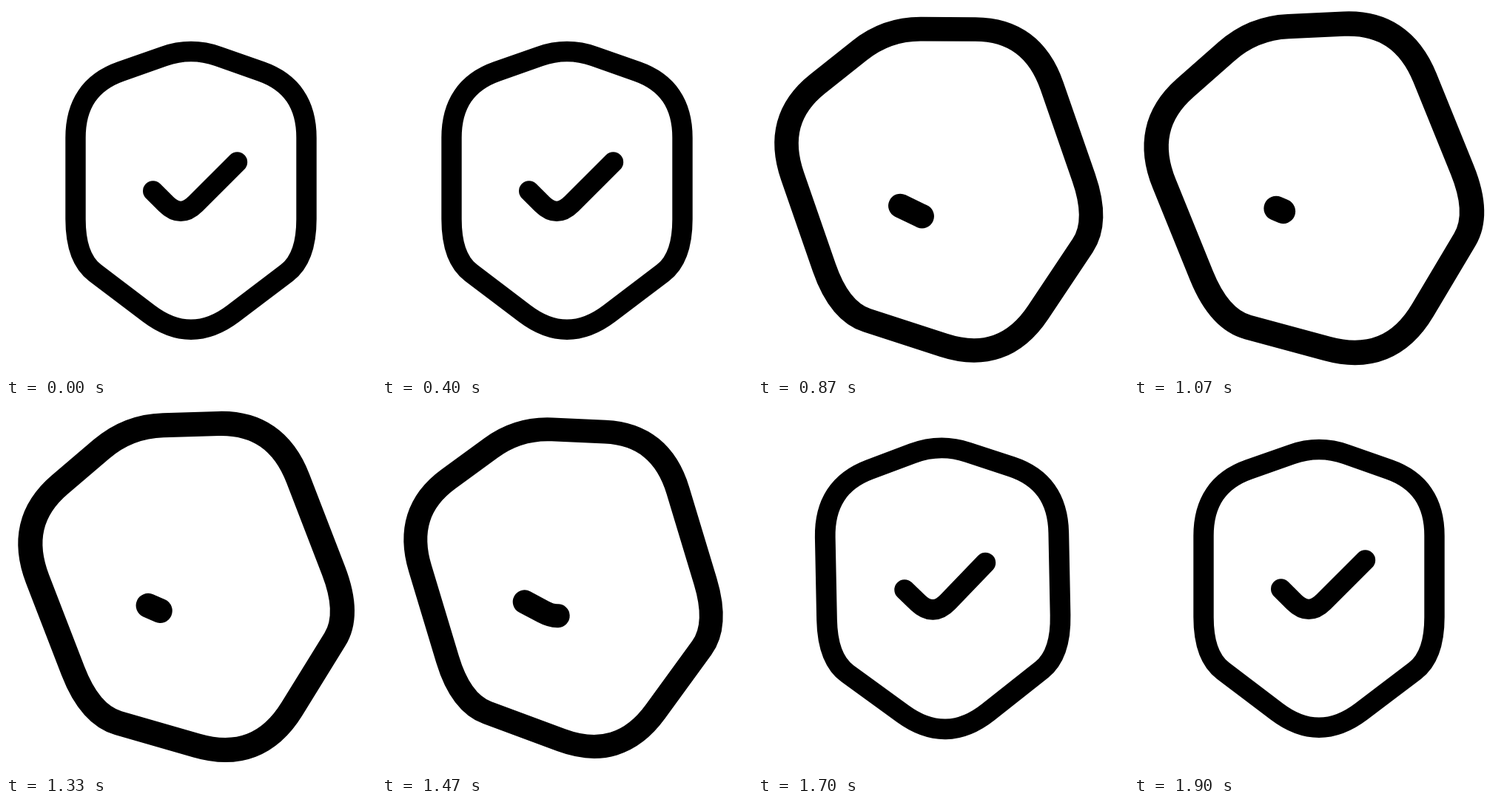
An HTML page with a canvas that plays this animation: 500x500 px, repeating every 2 s.

```html
<!DOCTYPE html>
<html lang="en">
<head>
<meta charset="utf-8">
<title>Shield check</title>
<style>
  html, body { margin: 0; width: 100%; height: 100%; overflow: hidden; background: #fff; }
  canvas { display: block; width: 100vw; height: 100vh; object-fit: contain; }
</style>
</head>
<body>
<canvas id="stage" width="500" height="500"></canvas>
<script>
const ctx = document.getElementById('stage').getContext('2d');
const LOOP = 2000, FRAME = 1000 / 30;
const START = 390, PEAK = 1143, END = 1895;
const MAX_TURN = -22.2 * Math.PI / 180, MAX_GROWTH = 0.22, MAX_TRIM = 0.95;
const STROKE = 27.4, CHECK_LENGTH = 150.4;

const shield = new Path2D();
shield.moveTo(-37, -181.9);
shield.quadraticCurveTo(0, -195, 37, -181.9);
shield.lineTo(95, -161.5);
shield.quadraticCurveTo(156, -140, 156, -72);
shield.lineTo(156, 38);
shield.quadraticCurveTo(156, 90.5, 129.7, 110.5);
shield.lineTo(57, 165.6);
shield.quadraticCurveTo(0, 208.9, -57, 165.6);
shield.lineTo(-129.7, 110.5);
shield.quadraticCurveTo(-156, 90.5, -156, 38);
shield.lineTo(-156, -72);
shield.quadraticCurveTo(-156, -140, -95, -161.5);
shield.closePath();

const check = new Path2D();
check.moveTo(-51.3, 0);
check.lineTo(-34, 17.3);
check.quadraticCurveTo(-13.9, 37.4, 6.2, 17.3);
check.lineTo(62.5, -39);

// cubic-bezier(.8, 0, .2, 1), solved by bisection
function ease(x) {
  if (x <= 0) return 0;
  if (x >= 1) return 1;
  let low = 0, high = 1, s = 0.5;
  for (let i = 0; i < 30; i++) {
    s = (low + high) / 2;
    const r = 1 - s;
    if (2.4 * s * r * r + 0.6 * s * s * r + s ** 3 < x) low = s;
    else high = s;
  }
  return s * s * (3 - 2 * s);
}

function amountAt(ms) {
  return ms < PEAK
    ? ease((ms - START) / (PEAK - START))
    : ease((END - ms) / (END - PEAK));
}

function draw(ms) {
  const amount = amountAt(ms);
  const scale = 1 + MAX_GROWTH * amount;
  ctx.setTransform(1, 0, 0, 1, 0, 0);
  ctx.fillStyle = '#fff';
  ctx.fillRect(0, 0, 500, 500);
  ctx.translate(250, 250);
  ctx.rotate(MAX_TURN * amount);
  ctx.scale(scale, scale);
  ctx.strokeStyle = '#000';
  ctx.lineWidth = STROKE;
  ctx.lineCap = ctx.lineJoin = 'round';
  ctx.setLineDash([]);
  ctx.stroke(shield);
  if (amount > 0) ctx.setLineDash([CHECK_LENGTH * (1 - MAX_TRIM * amount), 1000]);
  ctx.stroke(check);
}

const origin = performance.now();
function tick() {
  const ms = (performance.now() - origin) % LOOP;
  // the motion advances at 30 frames per second
  draw(Math.floor((ms + 3.5) / FRAME) * FRAME);
  requestAnimationFrame(tick);
}
tick();
</script>
</body>
</html>
```
